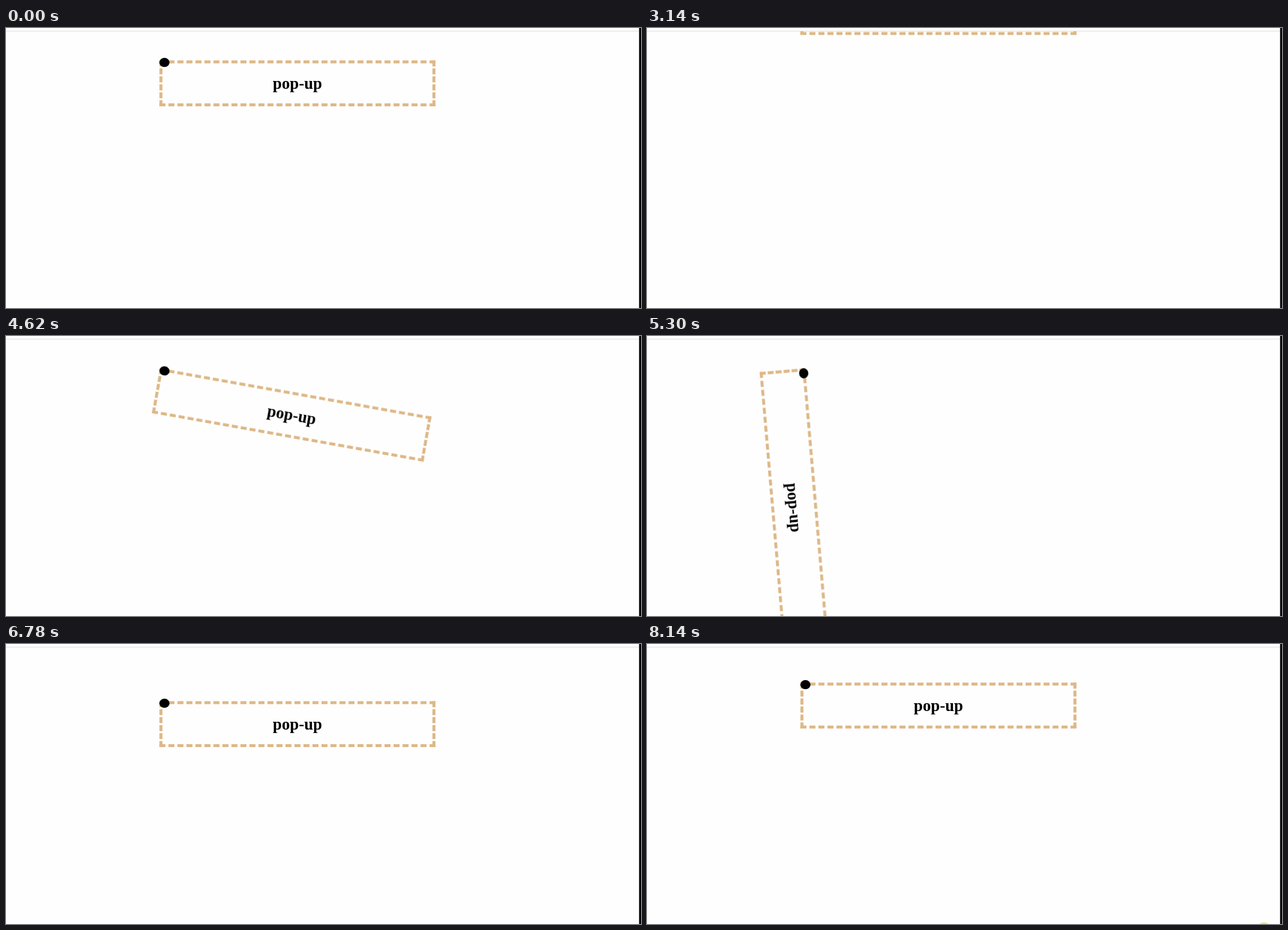
These frames come from a looping animation (1127 px wide and 497 px high, 8220 ms). An HTML page:

```html
<!DOCTYPE html>
<html lang="en">
<head>
<meta charset="utf-8">
<title>Pop-up</title>
<style>
  html, body { margin: 0; width: 100%; height: 100%; overflow: hidden; background: #fefefe; }
  svg { display: block; width: 1127px; height: 497px; }
  #box { transform-origin: 276.9px 62px; }
  #box path { fill: none; stroke: #deb887; stroke-width: 5.33; }
  #box .across { stroke-dasharray: 10.67 5.31; }
  #box .down { stroke-dasharray: 10.67 3.5; }
  #box text { font: bold 28.6px "Liberation Serif", "Times New Roman", serif; text-anchor: middle; }
</style>
</head>
<body>
<svg viewBox="0 0 1127 497">
  <clipPath id="page"><rect y="6" width="1124" height="491"/></clipPath>
  <g clip-path="url(#page)">
    <g id="box">
      <path class="across" d="M272.3 60.2H762.2M272.3 136.4H762.2"/>
      <path class="down" d="M275 57.5V139.1M759.5 57.5V139.1"/>
      <text x="517.3" y="108.3">pop-up</text>
      <ellipse cx="281.2" cy="61.2" rx="9" ry="8.1"/>
    </g>
  </g>
  <circle id="spot" cx="1095" cy="506" r="12" fill="#f2e468" opacity="0"/>
  <rect y="5" width="1124" height="1" fill="#dcdcdc"/>
  <rect x="1123.6" width="3.4" height="497"/>
</svg>
<script>
  const LOOP = 8220;

  const play = (id, frames) => document.getElementById(id)
    .animate(frames, { duration: LOOP, iterations: Infinity });

  // time in ms, vertical shift, angle, easing towards the next pose
  const poses = [
    [0, 0, 0],
    [1530, 0, 0],
    [1530, -200, 0],
    [3060, -200, 0],
    [3060, -135, 0],
    [3670, -72, 0],
    [3900, -51, 0],
    [4495, 0, 0, 'ease'],
    [5628, 0, 90, 'ease-in-out'],
    [5890, -27, 146, 'ease-in-out'],
    [6680, 44.3, 0],
    [6780, 44, 0, 'ease-in-out'],
    [8870, 0, 0]
  ];

  // The last move is cut short by the loop, so its easing is trimmed to the part in view.
  const last = poses.length - 1;
  poses[last - 1][3] = 'cubic-bezier(.45, 0, .7, .72)';
  poses[last] = [LOOP, 9, 0];

  play('box', poses.map(([t, y, angle, easing = 'linear']) => ({
    offset: t / LOOP,
    transform: `translateY(${y}px) rotate(${angle}deg)`,
    easing
  })));

  play('spot', [[0, 0], [8140, 0], [8140, 1], [LOOP, 1]].map(([t, opacity]) => ({
    offset: t / LOOP,
    opacity
  })));
</script>
</body>
</html>
```
